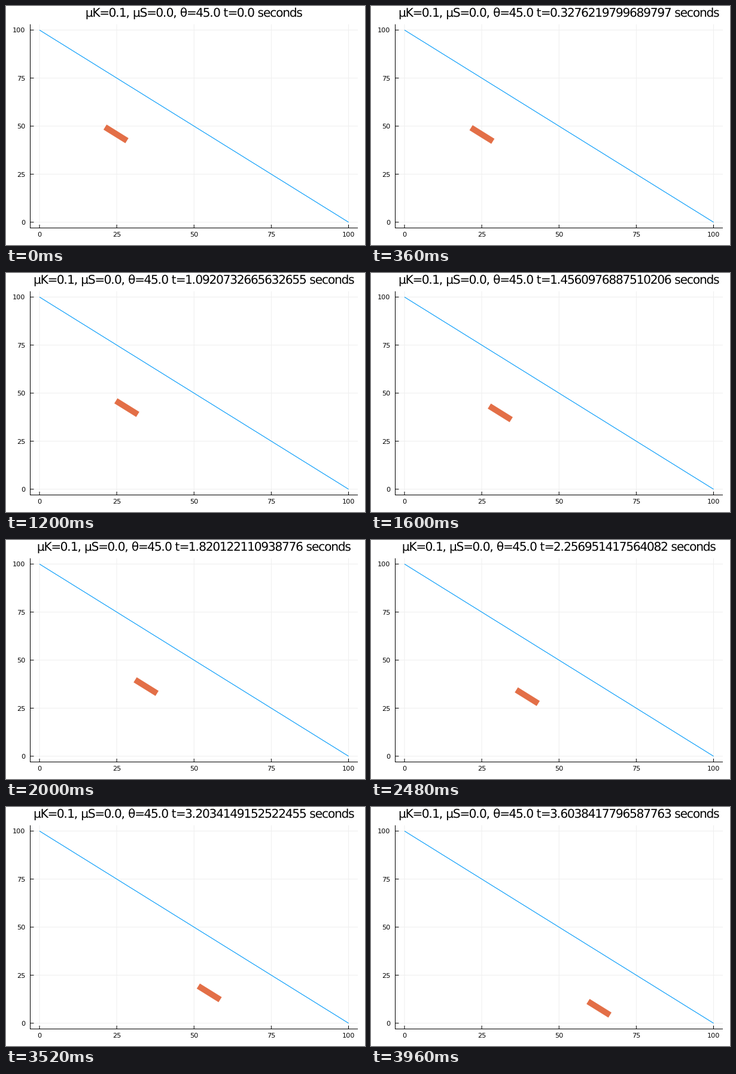
A matplotlib script that plays this animation: 600x400 px, repeating every 4 s.

```python
import math
from functools import lru_cache
import numpy as np
import matplotlib.pyplot as plt
from matplotlib.animation import FuncAnimation
from matplotlib.patches import PathPatch
from matplotlib.path import Path
from matplotlib.textpath import TextPath

W, H, DPI = 600, 400, 100
FRAMES, INTERVAL = 100, 40
LEFT, RIGHT, TOP, BOTTOM = 40.5, 588, 30.6, 371.5
LOW, HIGH = -3, 103
PX = 72 / DPI

C45 = math.cos(math.radians(45))
T_END = 3.6038417796587763
SLIDE = 54
BLOCK = 10

TITLE_SIZE = 20.2
TRACKING = 0.9

plt.rcParams["font.family"] = "DejaVu Sans"
fig = plt.figure(figsize=(W / DPI, H / DPI), dpi=DPI, facecolor="white")
ax = fig.add_axes([0, 0, 1, 1])
ax.set_xlim(0, W)
ax.set_ylim(H, 0)
ax.axis("off")


def sx(x):
    return LEFT + (x - LOW) / (HIGH - LOW) * (RIGHT - LEFT)


def sy(y):
    return BOTTOM - (y - LOW) / (HIGH - LOW) * (BOTTOM - TOP)


def line(xs, ys, color="black", width=1.0):
    return ax.plot(xs, ys, color=color, lw=width * PX, snap=False,
                   solid_capstyle="butt")[0]


def label(x, y, text, ha):
    ax.text(x, y, text, fontsize=11.2 * PX, color="black", ha=ha,
            va="baseline")


@lru_cache(None)
def ink_width(text):
    return TextPath((0, 0), text, size=TITLE_SIZE).get_extents().width


@lru_cache(None)
def glyph(char):
    """Outline of one character and its pen advance."""
    advance = ink_width("|" + char + "|") - ink_width("||")
    return TextPath((0, 0), char, size=TITLE_SIZE), advance * TRACKING


def tight_text(text, cx, baseline):
    """Centred line of text with close letter spacing."""
    pen, verts, codes = 0, [], []
    for char in text:
        shape, advance = glyph(char)
        if len(shape.vertices):
            verts.append(shape.vertices * [1, -1] + [pen, baseline])
            codes.append(shape.codes)
        pen += advance
    return Path(np.concatenate(verts) + [cx - pen / 2, 0],
                np.concatenate(codes))


for v in range(0, 101, 25):
    x, y = sx(v), sy(v)
    line([x, x], [TOP, BOTTOM], "#efefef")
    line([LEFT, RIGHT], [y, y], "#efefef")
    line([x, x], [BOTTOM, BOTTOM - 5.5])
    line([LEFT, LEFT + 6], [y, y])
    label(x, 386.4, str(v), "center")
    label(32.3, y + 4.2, str(v), "right")

line([LEFT, LEFT], [TOP, BOTTOM + 0.5])
line([LEFT - 0.5, RIGHT], [BOTTOM, BOTTOM])
line([sx(0), sx(100)], [sy(100), sy(0)], "#009afa", 1.1)

block = line([], [], "#e36f47", 10)
title = ax.add_patch(PathPatch(Path([[0, 0]]), fc="black", lw=0))


def update(i):
    t = float(np.longdouble(T_END) * i / (FRAMES - 1))
    s = SLIDE * (t / T_END) ** 2
    ends = np.array([30 + s, 30 + s + BLOCK]) * C45
    block.set_data(sx(ends), sy(100 * C45 - ends))
    text = f"μK=0.1, μS=0.0, θ=45.0 t={t} seconds"
    title.set_path(tight_text(text, 313.8, 18))
    return block, title


anim = FuncAnimation(fig, update, frames=FRAMES, interval=INTERVAL,
                     init_func=lambda: update(0), repeat=True, repeat_delay=0)
plt.show()
```
